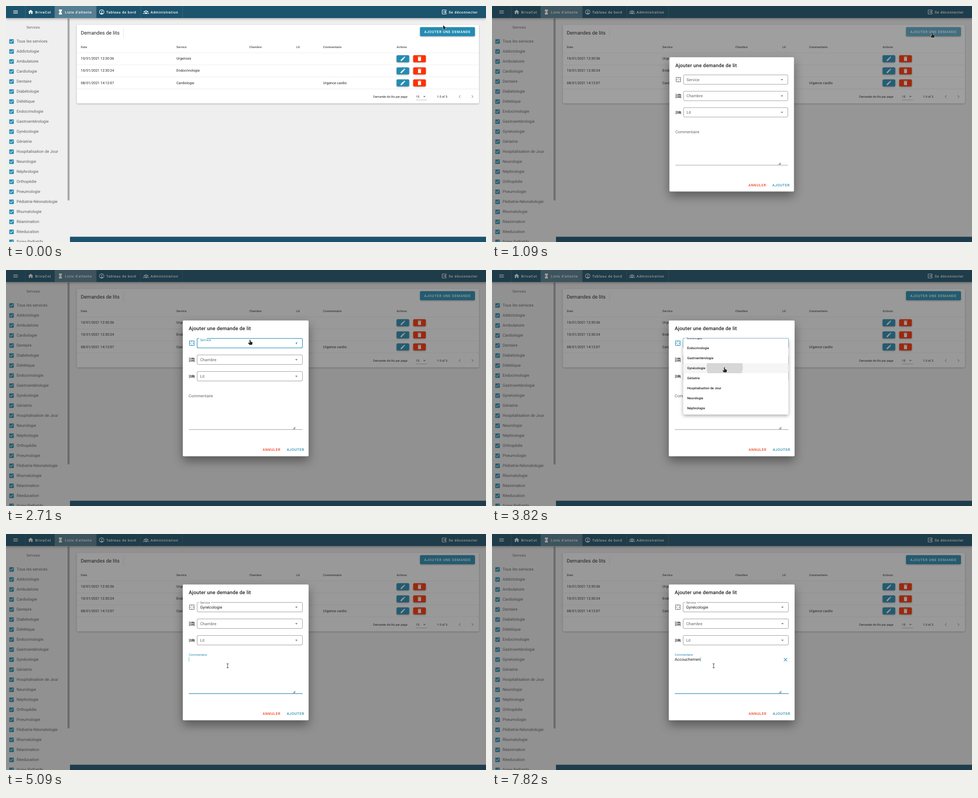
An HTML page with a canvas that plays this animation: 953 px wide and 471 px high, repeating every 8000 ms.

```html
<!DOCTYPE html>
<html lang="fr">
<head>
<meta charset="utf-8">
<title>Demandes de lits</title>
<style>
html, body { margin: 0; width: 100%; height: 100%; overflow: hidden; background: #efefef; }
canvas { display: block; width: 953px; height: 471px; }
</style>
</head>
<body>
<canvas id="stage"></canvas>
<script>
const W = 953, H = 471, LOOP = 8000;
const cv = document.getElementById('stage'), c = cv.getContext('2d');
const dpr = window.devicePixelRatio || 1;
cv.width = W * dpr;
cv.height = H * dpr;

const DARK = '#1c536d', PRIMARY = '#248cb2', RED = '#ff3000';
const INK = 'rgba(0,0,0,.87)', SOFT = 'rgba(0,0,0,.6)', LINE = 'rgba(0,0,0,.12)', ICON = 'rgba(0,0,0,.54)';

const SERVICES = ['Addictologie', 'Ambulatoire', 'Cardiologie', 'Dentaire', 'Diabétologie', 'Diététique',
  'Endocrinologie', 'Gastroentérologie', 'Gynécologie', 'Gériatrie', 'Hospitalisation de Jour', 'Neurologie',
  'Néphrologie', 'Orthopédie', 'Pneumologie', 'Pédiatrie-Néonatologie', 'Rhumatologie', 'Réanimation',
  'Rééducation'.replace('éd', 'ed'), 'Soins Palliatifs'];

const ICONS = {
  menu: 'M3 6H21V8H3ZM3 11H21V13H3ZM3 16H21V18H3Z',
  home: 'M10 20V14H14V20H19V12H22L12 3L2 12H5V20Z',
  sand: 'M6 2V8L10 12L6 16V22H18V16L14 12L18 8V2Z',
  gauge: 'M12 2A10 10 0 0 0 12 22A10 10 0 0 0 12 2ZM12 4A8 8 0 0 1 17.3 18Q12 14 6.7 18A8 8 0 0 1 12 4ZM13.2 6.5L11.7 10A2 2 0 1 0 13.6 10.8L15 7.3Z',
  group: 'M12 5A3.5 3.5 0 0 0 12 12A3.5 3.5 0 0 0 12 5ZM12 7A1.5 1.5 0 0 1 12 10A1.5 1.5 0 0 1 12 7Z' +
    'M5.5 8A2.5 2.5 0 0 0 5.5 13A2.5 2.5 0 0 0 5.5 8ZM18.5 8A2.5 2.5 0 0 0 18.5 13A2.5 2.5 0 0 0 18.5 8Z' +
    'M5.5 19V17.5Q6 14 12 14Q18 14 18.5 17.5V19ZM0 19V17.5Q.3 15.3 4.5 15Q3.5 16.5 3.5 19ZM24 19V17.5Q23.7 15.3 19.5 15Q20.5 16.5 20.5 19Z',
  exit: 'M14.1 15.6L16.7 13H7V11H16.7L14.1 8.4L15.5 7L20.5 12L15.5 17ZM19 3A2 2 0 0 1 21 5V9.7L19 7.7V5H5V19H19V16.3L21 14.3V19A2 2 0 0 1 19 21H5A2 2 0 0 1 3 19V5A2 2 0 0 1 5 3Z',
  check: 'M10 17L5 12L6.4 10.6L10 14.2L17.6 6.6L19 8ZM19 3H5A2 2 0 0 0 3 5V19A2 2 0 0 0 5 21H19A2 2 0 0 0 21 19V5A2 2 0 0 0 19 3Z',
  pencil: 'M20.7 7A1 1 0 0 0 20.7 5.6L18.4 3.3A1 1 0 0 0 17 3.3L15.1 5.1L18.9 8.9ZM3 17.2V21H6.8L17.8 9.9L14.1 6.2Z',
  bin: 'M19 4H15.5L14.5 3H9.5L8.5 4H5V6H19ZM6 19A2 2 0 0 0 8 21H16A2 2 0 0 0 18 19V7H6Z',
  down: 'M7 10L12 15L17 10Z',
  left: 'M15.4 16.6L10.8 12L15.4 7.4L14 6L8 12L14 18Z',
  right: 'M8.6 16.6L13.2 12L8.6 7.4L10 6L16 12L10 18Z',
  close: 'M19 6.4L17.6 5L12 10.6L6.4 5L5 6.4L10.6 12L5 17.6L6.4 19L12 13.4L17.6 19L19 17.6L13.4 12Z',
  plan: 'M2 2H22V22H2ZM4 4V11H8V13H4V20H11V17H13V20H20V13H15V11H20V4H13V8H11V4ZM10 11H12V13H10Z',
  bunk: 'M1 2H3V9H10V4H19A4 4 0 0 1 23 8V22H21V19H3V22H1ZM3 11V16H10V13H21V11ZM6.5 4A2 2 0 0 0 6.5 8A2 2 0 0 0 6.5 4ZM6.5 11.8A1.8 1.8 0 0 0 6.5 15.4A1.8 1.8 0 0 0 6.5 11.8Z',
  bed: 'M19 7H11V14H3V5H1V20H3V17H21V20H23V11A4 4 0 0 0 19 7ZM7 13A3 3 0 0 0 7 7A3 3 0 0 0 7 13Z'
};
for (const k in ICONS) ICONS[k] = new Path2D(ICONS[k]);

const ARROW = new Path2D('M0 0V8.6L2 6.8L3.3 9.6L4.6 9L3.4 6.3H6Z');
const HAND = new Path2D('M-.9 .8Q0 -.6 .9 .8V4L4.2 4.9Q5.2 5.3 4.9 6.6L4 10.3H-1.2L-3.7 6.9Q-3.9 5.7 -2.6 6L-.9 7.2Z');

// Moments when the picture changes: [first, last, steps] or one time.
const typed = [5440, 5800, 5980, 6130, 6330, 6470, 6640, 7160, 7380, 7580, 7820];
const steps = [[420, 620, 10], [1090, 1330, 4], [1490, 2290, 11], 2400, 2710, [2870, 3310, 5], 3600, 3820,
  [3960, 4620, 10], [4780, 5090, 5], [5440, 5800, 5], ...typed.slice(2)]
  .flatMap(s => s.length ? Array.from({ length: s[2] }, (_, i) => s[0] + (s[1] - s[0]) * i / (s[2] - 1)) : s);
const snap = t => steps.reduce((a, s) => s <= t ? s : a, 0);

const clamp = v => Math.max(0, Math.min(1, v));
const ramp = (t, a, b) => clamp((t - a) / (b - a));
const ease = p => p * p * (3 - 2 * p);
const mix = (a, b, p) => a + (b - a) * p;

function text(s, x, y, size, color, weight = 400, spacing = 0, align = 'left') {
  c.font = `${weight} ${size}px Roboto, sans-serif`;
  c.letterSpacing = spacing + 'px';
  c.textAlign = align;
  c.fillStyle = color;
  c.fillText(s, x, y + size * .34);
}
const caps = (s, x, y, color) => text(s, x, y, 7, color, 500, .625);

function rect(x, y, w, h, color) {
  c.fillStyle = color;
  c.fillRect(x, y, w, h);
}

function box(x, y, w, h, r, color, blur = 0, dy = 0, alpha = .3) {
  c.save();
  if (blur) {
    c.shadowColor = `rgba(0,0,0,${alpha})`;
    c.shadowBlur = blur * dpr;
    c.shadowOffsetY = dy * dpr;
  }
  c.fillStyle = color;
  c.beginPath();
  c.roundRect(x, y, w, h, r);
  c.fill();
  c.restore();
}

function icon(name, x, y, color, turn = 0) {
  c.save();
  c.translate(x, y);
  c.rotate(turn);
  c.scale(.5, .5);
  c.translate(-12, -12);
  c.fillStyle = color;
  c.fill(ICONS[name], 'evenodd');
  c.restore();
}

function sidebar() {
  text('Services', 54, 42.5, 7, SOFT, 400, 0, 'center');
  ['Tous les services', ...SERVICES].forEach((s, i) => {
    const y = 70.7 + 20 * i;
    icon('check', 11, y, PRIMARY);
    text(s, 21, y, 8, SOFT);
  });
  box(122.2, 25, 4, 363, 0, '#a8a8a8');
}

function appBar() {
  box(0, 0, W, 24, 0, DARK, 5, 1.5, .35);
  rect(97, 0, 82, 24, '#557f92');
  [38, 96.5, 179, 267, 350].forEach(x => rect(x, 0, .5, 24, 'rgba(255,255,255,.25)'));
  icon('menu', 19, 12, '#fff');
  [['home', 49, 'BrivaCot', 58], ['sand', 108, "Liste d'attente", 117], ['gauge', 190, 'Tableau de bord', 199],
    ['group', 278, 'Administration', 287], ['exit', 870, 'Se déconnecter', 879]].forEach(([ic, ix, s, x]) => {
    icon(ic, ix, 12, '#fff');
    caps(s, x, 12.2, '#fff');
  });
}

function table(glow) {
  box(140.5, 37.5, 798.5, 157, 2, '#fff', 3, 1, .3);
  text('Demandes de lits', 148.5, 53.7, 10, INK);
  rect(233, 43.5, .6, 20, 'rgba(0,0,0,.16)');
  box(822, 42.3, 109, 18, 2, PRIMARY, 3, 1, .35);
  if (glow) box(822, 42.3, 109, 18, 2, `rgba(255,255,255,${glow})`);
  caps('AJOUTER UNE DEMANDE', 830.3, 51.4, '#fff');

  const cols = [148.5, 338.3, 483, 576.5, 629.6, 775.5];
  ['Date', 'Service', 'Chambre', 'Lit', 'Commentaire', 'Actions']
    .forEach((s, i) => text(s, cols[i], 81.5, 6, SOFT, 700));
  [['10/01/2021 12:30:36', 'Urgences', ''], ['10/01/2021 12:30:24', 'Endocrinologie', ''],
    ['08/01/2021 14:12:07', 'Cardiologie', 'Urgence cardio']].forEach(([date, service, note], i) => {
    const y = 105.3 + 24.1 * i;
    rect(140.5, 93 + 24.1 * i, 798.5, .5, LINE);
    text(date, cols[0], y - .3, 7, INK);
    text(service, cols[1], y - .3, 7, INK);
    text(note, cols[4], y - .3, 7, INK);
    box(775.5, y - 7, 25, 14, 2, PRIMARY, 3, 1, .35);
    icon('pencil', 788, y, '#fff');
    box(808.5, y - 7, 25, 14, 2, RED, 3, 1, .35);
    icon('bin', 821, y, '#fff');
  });
  rect(140.5, 165.3, 798.5, .6, LINE);
  text('Demande de lits par page', 729, 181, 6, INK);
  text('15', 814, 181, 6, INK);
  rect(814, 187.3, 22, .6, 'rgba(0,0,0,.42)');
  icon('down', 830.7, 180.8, ICON);
  text('1-3 of 3', 855.8, 181, 6, INK);
  icon('left', 901, 180.7, 'rgba(0,0,0,.38)');
  icon('right', 926, 180.7, 'rgba(0,0,0,.38)');
}

function field(y, ic, label, { up = 0, focus = false, hover = false, value = '', turn = 0 } = {}) {
  const tint = focus ? PRIMARY : null, size = mix(8, 6, up);
  icon(ic, 369, y, tint || ICON);
  c.strokeStyle = tint || (hover ? 'rgba(0,0,0,.8)' : 'rgba(0,0,0,.4)');
  c.lineWidth = focus ? 1.1 : .9;
  c.beginPath();
  c.roundRect(379.5, y - 9.5, 209, 19, 2);
  c.stroke();
  if (up) rect(383.5, y - 10.3, 23.5 * up, 1.8, '#fff');
  text(label, 385.4, mix(y + .2, y - 9, up), size, tint || SOFT);
  text(value, 385.4, y + .4, 8, INK);
  icon('down', 576.6, y, tint || ICON, turn);
}

function comment(t) {
  const on = t >= 4780, up = on ? ease(ramp(t, 4700, 5090)) : 0;
  const word = 'Accouchement'.slice(0, typed.filter(k => t >= k).length);
  text('Commentaire', 362.8, mix(251, 240.8, up), mix(8, 6, up), on ? PRIMARY : SOFT);
  text(word, 362.8, 250.1, 8, INK);
  if (on) rect(362.8 + c.measureText(word).width, 245.3, .6, 9.4, PRIMARY);
  c.globalAlpha = ramp(t, 5350, 5800);
  icon('close', 582.7, 250.8, PRIMARY);
  c.globalAlpha = 1;

  rect(363, 318.2, 225.7, .8, t >= 4400 ? 'rgba(0,0,0,.8)' : 'rgba(0,0,0,.45)');
  if (on) rect(475.8 - 112.9 * up, 318, 225.8 * up, 1.1, PRIMARY);
  c.fillStyle = 'rgba(0,0,0,.38)';
  c.beginPath();
  c.moveTo(574.3, 312.5);
  c.lineTo(574.3, 317.5);
  c.lineTo(569, 317.5);
  c.fill();
}

function menu(t, y) {
  const show = t < 3900 ? ramp(t, 2790, 2980) : 1 - ramp(t, 3900, 4180);
  if (t < 2870 || !show) return;
  const top = 136.5, scroll = 114 * ease(ramp(t, 2950, 3310));
  c.save();
  c.globalAlpha = show;
  box(379.5, top, 209, 152, 2, '#fff', 7, 2.5, .35);
  c.beginPath();
  c.rect(379.5, top, 209, 152);
  c.clip();
  SERVICES.forEach((s, i) => {
    const ry = top + 3.5 + 20 * i - scroll;
    if (ry < top - 20 || ry > top + 152) return;
    if (y >= ry && y < ry + 20) rect(379.5, ry, 209, 20, 'rgba(0,0,0,.04)');
    text(s, 387.5, ry + 10, 6.5, INK, 500);
  });
  if (t >= 3600) {
    c.beginPath();
    c.rect(379.5, 186, 209, 20);
    c.clip();
    c.beginPath();
    c.arc(462, 194, t < 3820 ? 6.5 : 36, 0, 7);
    c.fillStyle = LINE;
    c.fill();
  }
  c.restore();
}

function dialog(t, x, y) {
  const p = ramp(t, 1090, 1330), k = mix(.99, 1, ease(p));
  rect(0, 0, W, H, `rgba(33,33,33,${mix(.43, .46, p)})`);
  c.save();
  c.translate(475.9, 236.2);
  c.scale(k, k);
  c.translate(-475.9, -236.2);
  box(351, 100.8, 249.8, 270.9, 2, '#fff', 20, 9, .4);
  text('Ajouter une demande de lit', 362.8, 117, 10, INK, 500, .125);

  const focus = t >= 2710 && t < 4780;
  const up = t < 2710 ? 0 : mix(.66, 1, ramp(t, 2710, 2870));
  field(146, 'plan', 'Service', {
    up, focus,
    hover: t >= 2250 && t < 2710,
    value: t >= 3960 ? 'Gynécologie' : '',
    turn: Math.PI * (t < 3900 ? up : 1 - ramp(t, 3900, 4200))
  });
  field(179, 'bunk', 'Chambre', { hover: t > 3960 && y > 169 && y < 189 && t > 4180 });
  field(212, 'bed', 'Lit', { hover: t > 4180 && y > 202 && y < 222 });
  comment(t);
  caps('ANNULER', 509.4, 358.7, '#f4401c');
  caps('AJOUTER', 557.4, 358.7, PRIMARY);
  menu(t, y);
  c.restore();
}

// Pointer stops: [time, x, y], eased between neighbours.
const path = [[400, 868, 38.3], [620, 874, 53], [1430, 874, 53], [2290, 484.5, 139], [2800, 484.5, 139],
  [3310, 461.5, 194], [3900, 461.5, 194], [4620, 440, 263]];

function pointerAt(t) {
  const i = path.findIndex(k => k[0] > t);
  if (i === 0) return path[0].slice(1);
  if (i < 0) return path[path.length - 1].slice(1);
  const a = path[i - 1], b = path[i], p = ease(ramp(t, a[0], b[0]));
  return [mix(a[1], b[1], p), mix(a[2], b[2], p)];
}

function pointer(t, x, y) {
  if (t > 3960 && y > 240) {
    c.strokeStyle = '#333';
    c.lineWidth = .9;
    c.stroke(new Path2D(`M${x - 2} ${y - 4}H${x + 2}M${x - 2} ${y + 4}H${x + 2}M${x} ${y - 4}V${y + 4}`));
    return;
  }
  const onField = [146, 179, 212].some(f => Math.abs(y - f) < 10) && x > 379 && x < 589;
  const hand = t < 1490 ? y > 42 : onField || (t >= 2870 && t < 4180);
  const shape = hand ? HAND : ARROW;
  c.save();
  c.translate(x, y);
  c.lineJoin = 'round';
  c.lineWidth = 1;
  c.strokeStyle = 'rgba(255,255,255,.85)';
  c.stroke(shape);
  c.fillStyle = '#222';
  c.fill(shape);
  c.restore();
}

function draw(now) {
  const t = snap(now % LOOP), [x, y] = pointerAt(t);
  c.setTransform(dpr, 0, 0, dpr, 0, 0);
  c.textRendering = 'geometricPrecision';
  c.textBaseline = 'alphabetic';
  rect(0, 0, W, H, '#efefef');
  sidebar();
  table(t < 420 ? 0 : t < 1090 ? .08 : .25 * (1 - ramp(t, 1090, 1330)));
  rect(127, 460.5, W - 127, 11, DARK);
  appBar();
  if (t >= 1090) dialog(t, x, y);
  pointer(t, x, y);
}

const start = performance.now();
(function tick() {
  draw(performance.now() - start);
  requestAnimationFrame(tick);
})();
</script>
</body>
</html>
```
